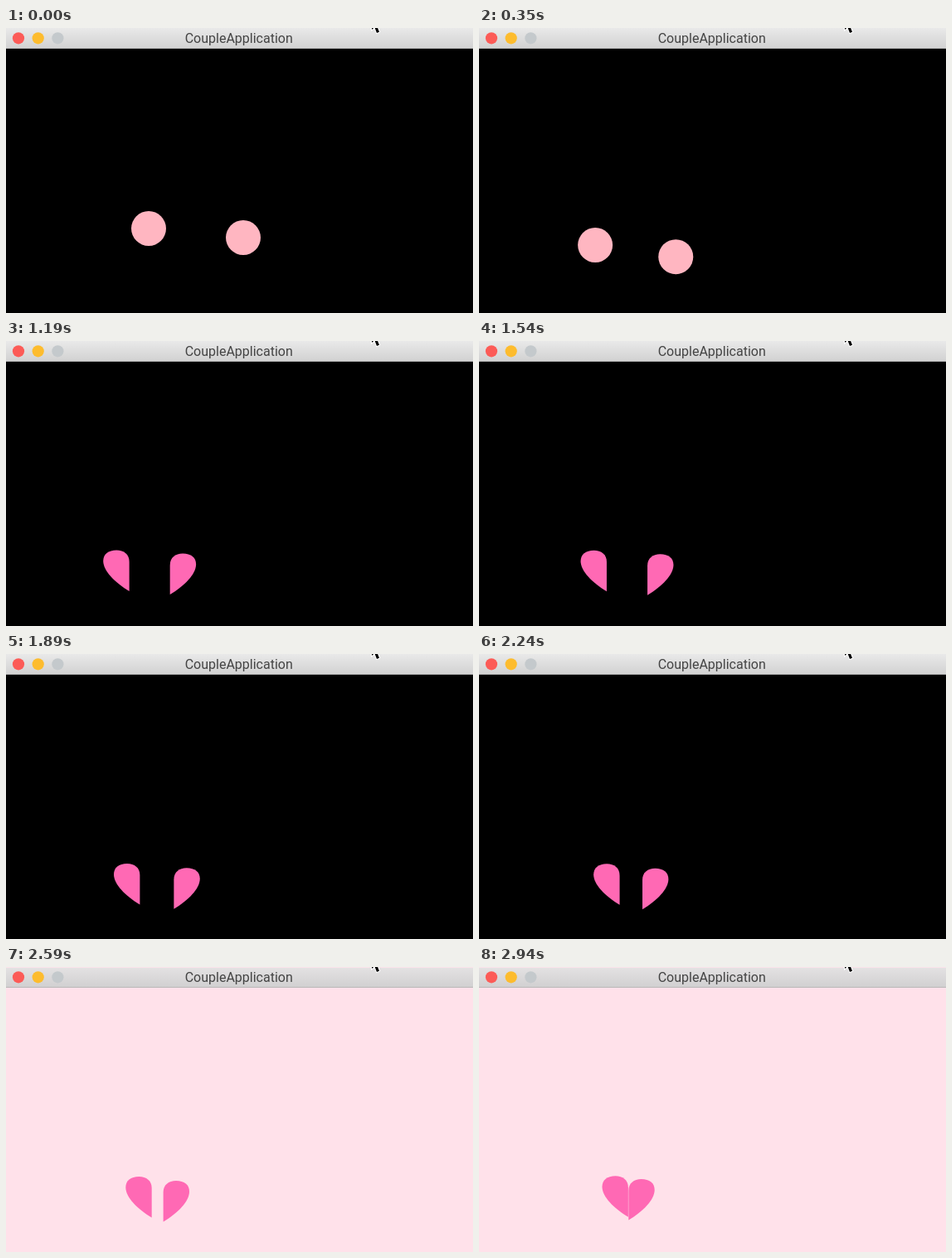
An HTML page with a canvas for the animation above (2960 ms loop, 563 px wide and 344 px high).

```html
<!DOCTYPE html>
<html lang="en">
<head>
<meta charset="utf-8">
<title>CoupleApplication</title>
<style>
html, body { margin: 0; width: 563px; height: 344px; overflow: hidden; }
canvas { display: block; }
</style>
</head>
<body>
<canvas id="stage" width="563" height="344"></canvas>
<script>
const ctx = document.getElementById('stage').getContext('2d');
const LOOP = 2960, STEP = 70;
const HEARTS_AT = 630, CLOSE_AT = 1680, PINK_AT = 2310, JOIN_AT = 2940;
const HALF_WIDTH = 31.4;

const half = new Path2D('M31.4 49.5V14C31.4 5 25 0 16 0C6 0 0 5 0 13C0 25 14 39 31.4 49.5Z');
const arrow = new Path2D('M441-12V2L444.3-1L447 6L450 4.7L447.3-2H452Z');

const lerp = (a, b, k) => a + (b - a) * k;
const ramp = (t, from, to) => Math.min(1, Math.max(0, (t - from) / (to - from)));

function disc(x, y, r, color) {
  ctx.fillStyle = color;
  ctx.beginPath();
  ctx.arc(x, y, r, 0, 2 * Math.PI);
  ctx.fill();
}

function drawCircles(t) {
  const k = t / 560;
  disc(lerp(172, 121, k), lerp(242, 274, k), 21, '#ffb6c1');
  disc(lerp(286, 208, k), lerp(253, 290, k), 21, '#ffb6c1');
}

function drawHalf(x, y, side) {
  ctx.save();
  ctx.translate(x, y);
  ctx.scale(side, 1);
  ctx.translate(-HALF_WIDTH, 0);
  ctx.fillStyle = '#ff69b4';
  ctx.fill(half);
  ctx.restore();
}

// The pair drifts along a slowing path, sags a little and closes its gap.
function drawHearts(t) {
  const middle = 167.6 - 22.8 * ((t - PINK_AT) / (PINK_AT - HEARTS_AT)) ** 2 + HALF_WIDTH / 2;
  const gap = lerp(49.1, 0.4, ramp(t, CLOSE_AT, JOIN_AT));
  const sag = Math.sin(Math.PI * ramp(t, HEARTS_AT, JOIN_AT) ** 2);
  drawHalf(middle - gap / 2, 252.2 + 1.1 * sag, 1);
  drawHalf(middle + gap / 2, 256 + 2.7 * sag, -1);
}

function drawBar(pink) {
  const shade = ctx.createLinearGradient(0, 0, 0, 24);
  shade.addColorStop(0, pink ? '#e4e2e3' : '#e9e9e9');
  shade.addColorStop(1, pink ? '#d1d0d1' : '#d2d2d2');
  ctx.fillStyle = shade;
  ctx.fillRect(0, 0, 563, 25);
  if (pink) {
    ctx.fillStyle = '#fbe3ea';
    ctx.fillRect(0, 0, 563, 1);
  }
  ctx.fillStyle = '#b8b8b8';
  ctx.fillRect(0, 24, 563, 1);
  ['#fc5b57', '#fdbc2e', '#c4c9cc'].forEach((color, i) => disc(15 + i * 23.7, 12.3, 7.1, color));
  ctx.fillStyle = '#444';
  ctx.font = '16px Roboto, Inter, sans-serif';
  ctx.textAlign = 'center';
  ctx.fillText('CoupleApplication', 280.7, 18);
  ctx.strokeStyle = '#fff';
  ctx.lineWidth = 2;
  ctx.stroke(arrow);
  ctx.fillStyle = '#000';
  ctx.fill(arrow);
}

function draw(t) {
  const pink = t >= PINK_AT;
  ctx.fillStyle = pink ? '#ffe1ea' : '#000';
  ctx.fillRect(0, 0, 563, 344);
  drawBar(pink);
  if (t < HEARTS_AT) drawCircles(t);
  else drawHearts(t);
}

const start = performance.now();
function tick() {
  const t = (performance.now() - start) % LOOP;
  draw(Math.floor(t / STEP) * STEP);
  requestAnimationFrame(tick);
}
tick();
</script>
</body>
</html>
```
